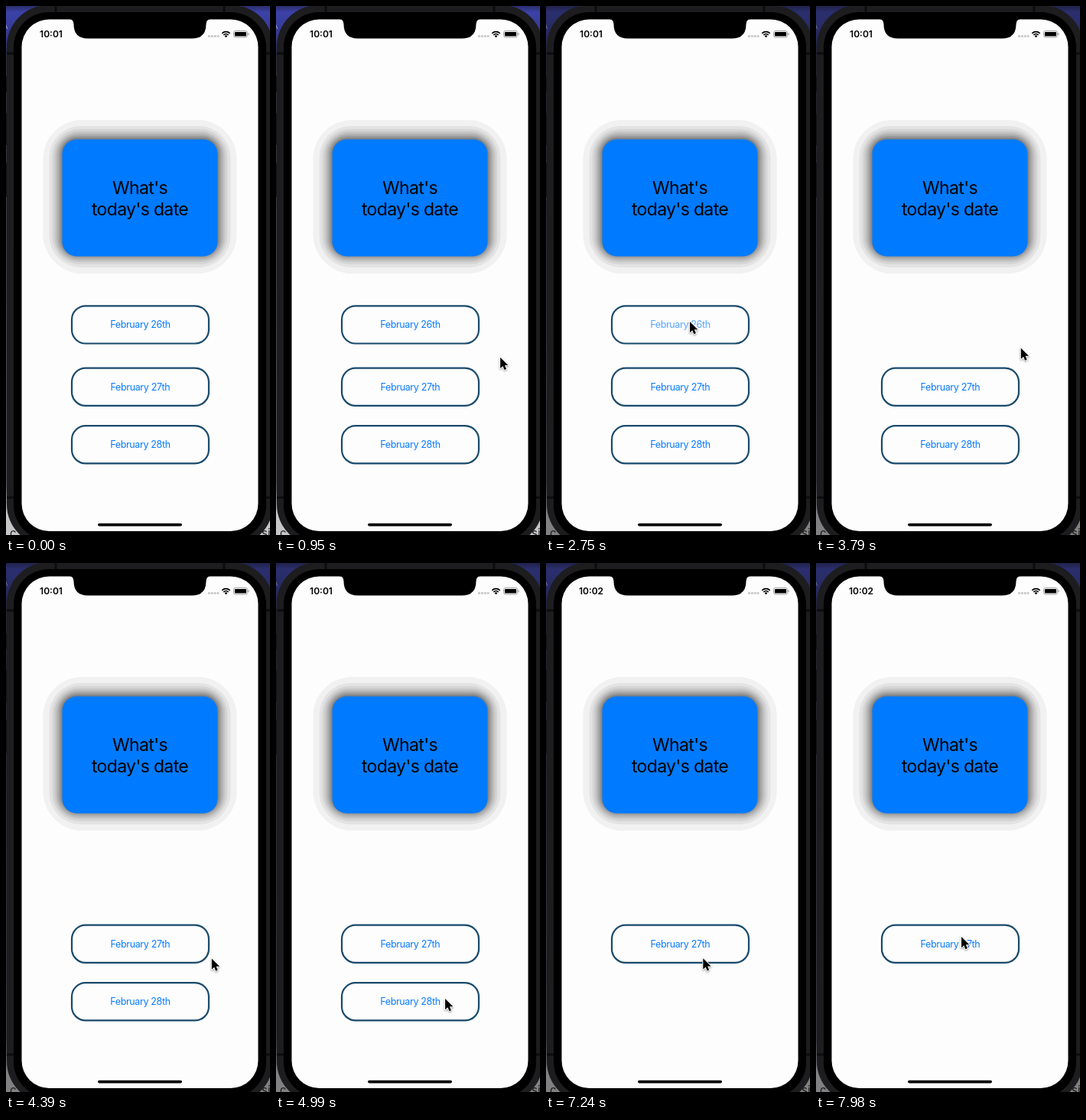
Write an HTML page that moves like this. It is 345 px wide and 692 px high and loops after 8000 ms.

```html
<!DOCTYPE html>
<html lang="en">
<head>
<meta charset="utf-8">
<title>Date quiz</title>
<style>
  html, body { margin: 0; height: 100%; overflow: hidden; background: #000; }
  svg { display: block; width: 345px; height: 692px; font-family: Inter, "Open Sans", sans-serif; }
  .question { font-size: 23px; letter-spacing: -.65px; text-anchor: middle; }
  .option rect { fill: none; stroke: #194a6b; stroke-width: 2.2; }
  .option text { font-size: 12.5px; letter-spacing: -.37px; text-anchor: middle; fill: #087bff; }
  #clock { font-size: 12px; font-weight: 600; text-anchor: middle; }
  .behind { font-size: 15px; fill: #222; }
</style>
</head>
<body>
<svg viewBox="0 0 345 692">
  <defs>
    <linearGradient id="desktop" x2="0" y2="1">
      <stop offset="0" stop-color="#2a2e6c"/>
      <stop offset=".012" stop-color="#3c42a8"/>
      <stop offset=".06" stop-color="#33388c"/>
      <stop offset=".1" stop-color="#2b2c38"/>
      <stop offset=".9" stop-color="#55555a"/>
      <stop offset=".96" stop-color="#c6c6c9"/>
    </linearGradient>
  </defs>
  <rect width="345" height="692" fill="url(#desktop)"/>
  <text class="behind" x="-5" y="30" style="font-size:11px;fill:#9a9ed8">A</text>
  <text class="behind" x="5" y="695">c</text>
  <text class="behind" x="334" y="695">si</text>
  <rect id="dim" width="345" height="692" fill="#111" opacity=".38"/>

  <!-- phone body, screen and notch -->
  <rect x="1" y="-1" width="348" height="707" rx="54" fill="#1d1d1f"/>
  <path d="M65 0V8M285 0V8M1 62H10M340 62H345M1 643H10M340 643H345" stroke="#0c0c0d" stroke-width="3"/>
  <path d="M.5 92V113M.5 140V182M.5 205V250" stroke="#111"/>
  <rect x="10" y="8" width="330" height="691" rx="46"/>
  <rect x="20.5" y="17.5" width="309" height="669.5" rx="36" fill="#fdfdfd"/>
  <path d="M83 17H267Q261.500 18 261.500 24Q261.500 42.500 243 42.500H107Q88.500 42.500 88.500 24Q88.500 18 83 17Z"/>
  <rect x="120" y="676.800" width="110" height="3.600" rx="1.800"/>

  <!-- status bar -->
  <text id="clock" x="59" y="41"></text>
  <path d="M264 39.500H278.500" stroke="#c4c4c6" stroke-width="2.600" stroke-dasharray="2.900 1"/>
  <path d="M282.300 35.800a7.400 7.400 0 0 1 10.400 0M284.300 38a4.600 4.600 0 0 1 6.400 0" fill="none" stroke="#000" stroke-width="1.700"/>
  <path d="M287.500 41.200l-1.900-2a2.800 2.800 0 0 1 3.800 0Z"/>
  <rect x="297.500" y="32.500" width="18" height="8.500" rx="2.400" fill="none" stroke="#999" stroke-width=".9"/>
  <rect x="298.900" y="33.900" width="15.200" height="5.700" rx="1.200"/>
  <path d="M317 35.300v3" stroke="#999" stroke-width="1.200"/>

  <g id="shadow"></g>
  <rect x="73.500" y="174.500" width="203" height="153" rx="19" fill="#007aff"/>
  <text class="question" x="175" y="246">What's</text>
  <text class="question" x="175" y="274">today's date</text>

  <g id="options"></g>
  <path id="cursor" d="M0 0V14.300L3.300 11.200 5.400 16.200 7.900 15.100 5.800 10.300H10.300Z"
        stroke="#fff" stroke-width="1.900" paint-order="stroke" stroke-linejoin="round"
        style="filter:drop-shadow(0 1px 1px #0006)"/>
</svg>
<script>
const LOOP = 8000;
const $ = id => document.getElementById(id);

// Banded soft shadow: equal grey steps along a logistic falloff.
for (let alpha = 0.027; alpha < 0.5; alpha += 0.055) {
  const d = 7 * Math.log((1 - alpha) / alpha);
  const grey = Math.round(255 * (1 - alpha - 0.027));
  $('shadow').innerHTML += `<rect x="${73.5 - d}" y="${174 - d}" width="${203 + 2 * d}"
    height="${151 + 2 * d}" rx="${19 + 1.3 * d}" fill="rgb(${grey},${grey},${grey})"/>`;
}

const options = [
  { label: 'February 26th', y: 392.3, press: 2750, gone: 3050 },
  { label: 'February 27th', y: 473.7 },
  { label: 'February 28th', y: 549.2, press: 6040, gone: 6340 }
];
$('options').innerHTML = options.map(o => `<g class="option">
  <rect x="86" y="${o.y}" width="179" height="49.200" rx="18"/>
  <text x="175.500" y="${o.y + 28.8}">${o.label}</text></g>`).join('');
const optionNodes = [...$('options').children];

// Pointer moves: start, last step, step count, cubic control points.
const moves = [
  { from: 500, to: 650, steps: 2, x: [342, 340, 331, 328], y: [560, 545, 505, 474] },
  { from: 950, to: 1700, steps: 6, x: [328, 255, 200, 188], y: [474, 446, 412, 413] },
  { from: 3500, to: 4540, steps: 8, x: [188, 311, 270, 266], y: [413, 425, 500, 531] },
  { from: 4690, to: 5590, steps: 7, x: [266, 222, 200, 194], y: [531, 583, 575, 574] },
  { from: 6790, to: 7830, steps: 8, x: [194, 212, 206, 194.5], y: [574, 530, 495, 489] },
  { from: 7980, to: 7980, steps: 1, x: [194.5, 193, 191, 190], y: [489, 489, 489, 489] }
];

const bezier = ([a, b, c, d], u) => {
  const v = 1 - u;
  return v * v * v * a + 3 * v * v * u * b + 3 * v * u * u * c + u * u * u * d;
};

function drawCursor(t) {
  const move = moves.findLast(m => t >= m.from);
  $('cursor').style.display = move ? '' : 'none';
  if (!move) return;
  const interval = (move.to - move.from) / (move.steps - 1) || 1;
  const step = Math.min(move.steps, Math.floor((t - move.from + 8) / interval) + 1);
  const u = step / move.steps;
  $('cursor').setAttribute('transform', `translate(${bezier(move.x, u)} ${bezier(move.y, u)})`);
}

function draw(t) {
  options.forEach((o, i) => {
    optionNodes[i].style.display = t >= o.gone ? 'none' : '';
    optionNodes[i].lastElementChild.style.opacity = t >= o.press ? 0.68 : 1;
  });
  $('dim').style.display = t >= 2750 ? '' : 'none';
  $('clock').textContent = t < 6490 ? '10:01' : '10:02';
  drawCursor(t);
}

function tick() {
  draw(performance.now() % LOOP);
  requestAnimationFrame(tick);
}
tick();
</script>
</body>
</html>
```
